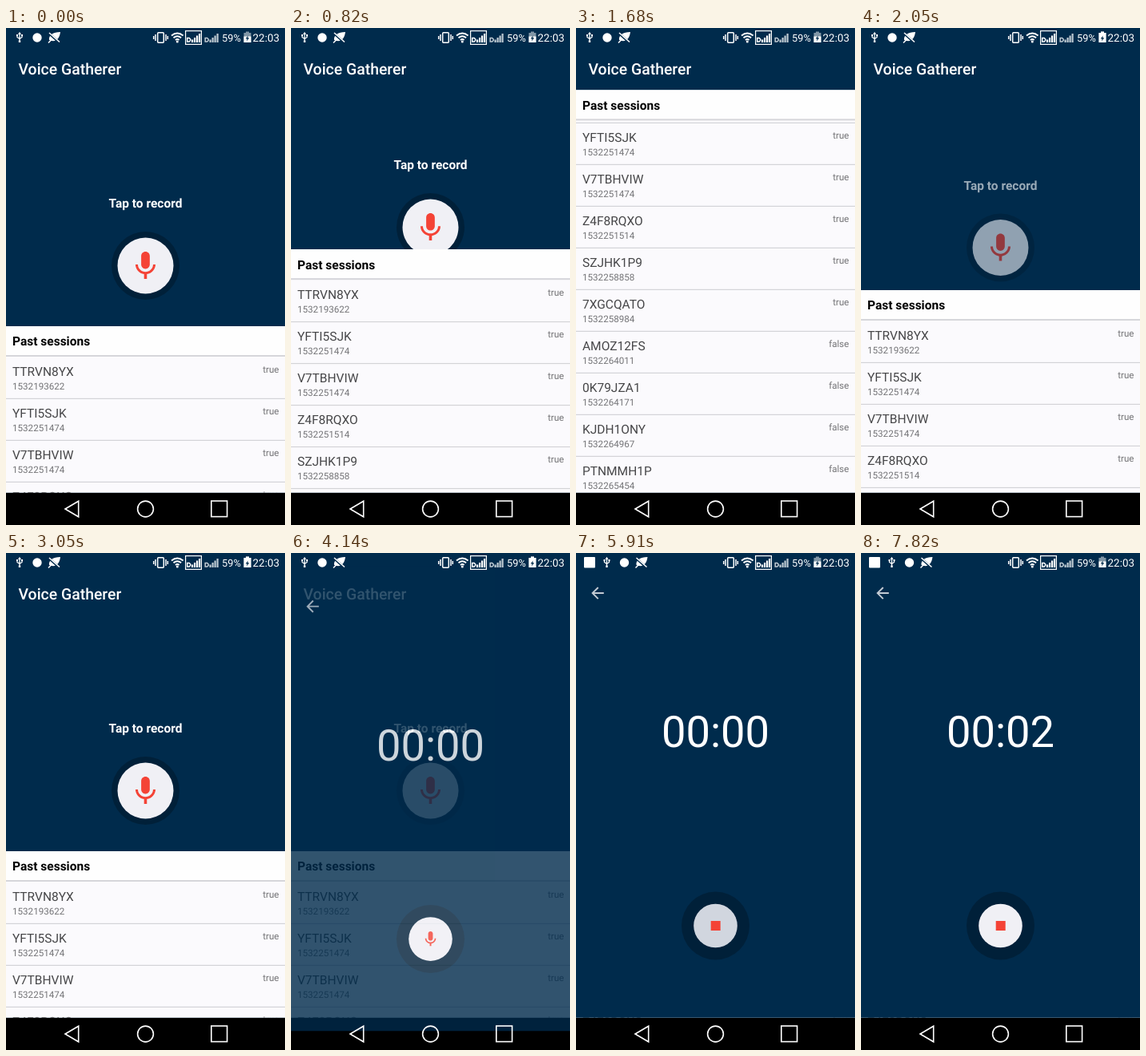
Recreate the animation shown at these times as an HTML page. Size 349x620 px, loop 8 s.

```html
<!DOCTYPE html>
<html lang="en">
<head>
<meta charset="utf-8">
<title>Voice recorder</title>
<style>
  html, body { margin: 0; width: 100%; height: 100%; overflow: hidden; background: #000; }
  svg { display: block; width: 349px; height: 620px; font-family: Roboto, sans-serif; text-rendering: geometricPrecision; }
  .bold { font-size: 15.5px; font-weight: 700; }
  .id { font-size: 15.5px; fill: #464648; }
  .small { font-size: 11.64px; fill: #747477; }
</style>
</head>
<body>
<svg viewBox="0 0 349 620">
  <defs>
    <path id="mic" fill="#f44336" d="M12 14c1.66 0 2.99-1.34 2.99-3L15 5c0-1.66-1.34-3-3-3S9 3.34 9 5v6c0 1.66 1.34 3 3 3zm5.3-3c0 3-2.54 5.1-5.3 5.1S6.7 14 6.7 11H5c0 3.41 2.72 6.23 6 6.72V21h2v-3.28c3.28-.48 6-3.3 6-6.72h-1.7z"/>
    <clipPath id="screen"><rect width="349" height="579.7"/></clipPath>
    <clipPath id="listBox"><rect y="409" width="349" height="600"/></clipPath>
  </defs>
  <rect width="349" height="620"/>

  <g clip-path="url(#screen)">
    <rect width="349" height="580" fill="#002b4c"/>
    <g id="hero">
      <text class="bold" x="174.5" y="224" text-anchor="middle" fill="#fff">Tap to record</text>
      <circle cx="174.5" cy="296.5" r="42.5" opacity=".25"/>
      <circle cx="174.5" cy="296.5" r="35" fill="#f0f0f5"/>
      <circle id="tap" cx="174.5" cy="296.5" r="35" fill="#002b4c" opacity="0"/>
      <use href="#mic" transform="translate(153 275.4) scale(1.79)"/>
    </g>
    <rect id="scrim" width="349" height="372" fill="#002b4c" opacity="0"/>
    <g id="sheet">
      <rect y="372" width="349" height="600" fill="#fbfafd"/>
      <g clip-path="url(#listBox)"><g id="rows"></g></g>
      <rect y="372" width="349" height="36" fill="#fefefe"/>
      <rect y="408" width="349" height="2" fill="#d6d6da"/>
      <text class="bold" x="8" y="396.4">Past sessions</text>
    </g>
    <text x="15.5" y="58" font-size="19.4" font-weight="500" fill="#fff">Voice Gatherer</text>
  </g>

  <g id="recorder" opacity="0">
    <rect width="349" height="579.7" fill="#002b4c"/>
    <path transform="translate(15.4 38.4) scale(.97)" fill="#c3cbd4" d="M20 11H7.83l5.59-5.59L12 4l-8 8 8 8 1.41-1.41L7.83 13H20v-2z"/>
    <text id="timer" x="174.5" y="242" text-anchor="middle" font-size="54.3" fill="#fff">00:00</text>
    <circle cx="174.5" cy="465" r="42.5" opacity=".25"/>
    <circle cx="174.5" cy="465" r="27.3" fill="#f0f0f5"/>
    <circle id="press" cx="174.5" cy="465" r="27.3" fill="#002b4c" opacity="0"/>
    <use id="smallMic" href="#mic" transform="translate(162.9 453.4) scale(.97)"/>
    <rect id="stop" x="168.7" y="459" width="12" height="12" fill="#f44336"/>
  </g>

  <g id="status" fill="#fff">
    <rect id="recIcon" x="10" y="5" width="14" height="13.5" rx="1"/>
    <g id="notes">
      <path d="M17 7v9M14 9v2.500l3 2 3-2V9" fill="none" stroke="#fff" stroke-width="1.300"/>
      <path d="M15 8 17 4.800 19 8zM15.800 15.500h2.400v2.500h-2.400zM13 8h2v2h-2zM19 8h2v2h-2z"/>
      <circle cx="39" cy="12" r="5.700"/>
      <path d="M54 15c-1-6 5-10 14-10-1 7-4 12-11 11z"/>
      <path d="M53 6 67 18.500" stroke="#002b4c" stroke-width="3"/>
      <path d="M54 6 67 17.500M53 18.500l4-4" stroke="#fff" stroke-width="1.500"/>
    </g>
    <g fill="none" stroke="#fff" stroke-width="1.500">
      <rect x="189.700" y="5.700" width="7.600" height="12.600" rx="1"/>
      <path d="M187 8v8M184.700 10v4M200 8v8M202.300 10v4"/>
      <path d="M207 9.500q7.300-6 14.600 0M209.500 12.300q4.800-4 9.600 0M212 15q2.300-2 4.600 0" stroke-width="1.900"/>
      <rect x="224.600" y="3.600" width="19.800" height="16.800" stroke-width="1.200"/>
    </g>
    <circle cx="214.300" cy="17" r="1.500"/>
    <g id="signal">
      <path d="M226.700 12.500h2.500l1.500 1.500v1.500l-1.500 1.500h-2.500z" fill="none" stroke="#fff" stroke-width="1.500"/>
      <path d="M232 14.500h2.200v3.500h-2.200zM235 12h2.200v6h-2.200zM238 9.500h2.200v8.500h-2.200zM241 7h2.200v11h-2.200z"/>
    </g>
    <use href="#signal" x="22.500" opacity=".75"/>
    <text x="270" y="17" font-size="12.8">59%</text>
    <path d="M300 4.500h4v1.500h2.500v12h-9v-12h2.500z" fill="#8196a6"/>
    <path id="charge"/>
    <path d="M302.700 9.500l-3 4h2l-.7 3 3.300-4.300h-2z" fill="#002b4c"/>
    <text x="308.600" y="17" font-size="13.4">22:03</text>
  </g>

  <g fill="none" stroke="#fff" stroke-width="1.600">
    <path d="M74 600 90.700 590.200v19.600z"/>
    <circle cx="174.500" cy="600" r="9.900"/>
    <rect x="256.800" y="590" width="19.800" height="19.600"/>
  </g>
</svg>
<script>
const LOOP = 8000, COLLAPSE = 294.6, SCRIM_AT = 240, ENTER = 4074, RECORD = 5820;
const $ = id => document.getElementById(id);
const set = (id, name, value) => $(id).setAttribute(name, value);
const shift = (id, x, y) => set(id, 'transform', `translate(${x} ${y})`);
const clamp = v => Math.min(1, Math.max(0, v));
const span = (t, from, to) => clamp((t - from) / (to - from));

const sessions = [
  ['TTRVN8YX', 1532193622, true], ['YFTI5SJK', 1532251474, true],
  ['V7TBHVIW', 1532251474, true], ['Z4F8RQXO', 1532251514, true],
  ['SZJHK1P9', 1532258858, true], ['7XGCQATO', 1532258984, true],
  ['AMOZ12FS', 1532264011, false], ['0K79JZA1', 1532264171, false],
  ['KJDH1ONY', 1532264967, false], ['PTNMMH1P', 1532265454, false]
];
$('rows').innerHTML = sessions.map(([id, stamp, done], i) => `
  <g transform="translate(0 ${i * 52})">
    <text class="id" x="8" y="434">${id}</text>
    <text class="small" x="8" y="451">${stamp}</text>
    <text class="small" x="341.500" y="430" text-anchor="end">${done}</text>
    <rect y="461.800" width="349" height="1.200" fill="#d3d3d7"/>
  </g>`).join('');

// Finger drag: time, distance
const drag = [[590, 0], [840, 105], [1090, 230.5], [1320, 335], [1480, 362], [1680, 344.2], [1900, 180], [2150, 0]];

function slope(i) {
  const a = drag[i - 1], b = drag[i], c = drag[i + 1];
  if (!a || !c) return 0;
  const l = (b[1] - a[1]) / (b[0] - a[0]), r = (c[1] - b[1]) / (c[0] - b[0]);
  return l * r <= 0 ? 0 : 2 * l * r / (l + r);
}

function scrollAt(t) {
  const i = drag.findIndex((p, k) => k < drag.length - 1 && t >= p[0] && t < drag[k + 1][0]);
  if (i < 0) return 0;
  const [t0, y0] = drag[i], [t1, y1] = drag[i + 1], h = t1 - t0, p = (t - t0) / h, q = 1 - p;
  return y0 * (1 + 2 * p) * q * q + y1 * p * p * (3 - 2 * p)
    + h * (slope(i) * p * q * q - slope(i + 1) * p * p * q);
}

// Times at which the header passes the scrim threshold
let scrimIn = 590, scrimOut = 2150;
while (scrollAt(scrimIn) < SCRIM_AT) scrimIn++;
while (scrollAt(scrimOut) < SCRIM_AT) scrimOut--;

function draw(t) {
  const y = scrollAt(t), head = Math.min(y, COLLAPSE);
  shift('hero', 0, -head / 2);
  shift('sheet', 0, -head);
  shift('rows', 0, head - y);
  set('scrim', 'opacity', t < scrimOut
    ? span(t, scrimIn, scrimIn + 500) ** 2
    : (1 - span(t, scrimOut, scrimOut + 600)) ** 2);
  set('tap', 'opacity', 0.12 * span(t, 3950, 4070));

  shift('recorder', 0, 48 * (1 - span(t, ENTER, ENTER + 350)) ** 5);
  set('recorder', 'opacity', 1 - (1 - span(t, ENTER, ENTER + 200)) ** 4);
  set('press', 'opacity', 0.13 * span(t, 5550, 5750) * (1 - span(t, 5930, 6230)));

  const recording = t >= RECORD;
  set('smallMic', 'opacity', recording ? 0 : 1);
  set('stop', 'opacity', recording ? 1 : 0);
  set('recIcon', 'opacity', recording ? 1 : 0);
  shift('notes', recording ? 21.5 : 0, 0);
  const seconds = recording ? Math.floor((t - RECORD) / 1000) : 0;
  $('timer').textContent = '00:0' + seconds;

  const low = Math.floor((t - 50) / 500) % 2 !== 0;
  set('charge', 'd', low ? 'M297.500 10.500h9v7.500h-9z' : 'M300 4.500h4v1.500h2.500v12h-9v-12h2.500z');
}

function tick() {
  draw(performance.now() % LOOP);
  requestAnimationFrame(tick);
}
tick();
</script>
</body>
</html>
```
